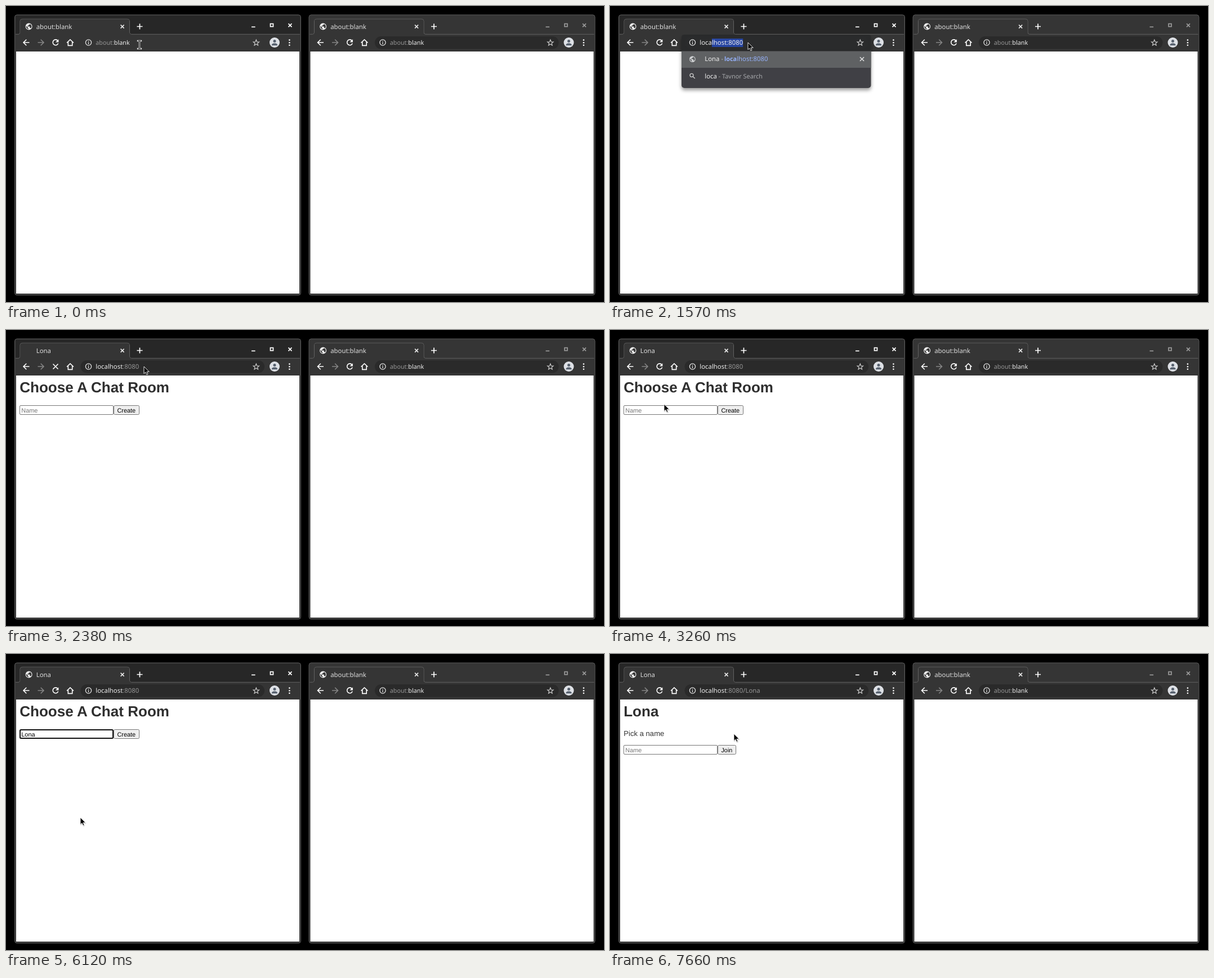
Recreate the animation shown at these times as an HTML page. Size 1062 by 527 pixels, loop 8 s.

```html
<!DOCTYPE html>
<html lang="en">
<head>
<meta charset="utf-8">
<title>Chat room demo</title>
<style>
  html, body { margin: 0; width: 100%; height: 100%; overflow: hidden; background: #000; }
  svg { display: block; width: 1062px; height: 527px; }
  text { text-rendering: geometricPrecision; white-space: pre; }
  .ui { font-family: "Noto Sans", sans-serif; font-size: 11.35px; }
  .page { font-family: "Liberation Sans", Arial, sans-serif; }
</style>
</head>
<body>
<svg id="stage" viewBox="0 0 1062 527"></svg>
<script>
const LOOP = 8000;
const UI = '11.35px "Noto Sans", sans-serif';
const FORM = '10.9px "Liberation Sans", Arial, sans-serif';
const stage = document.getElementById('stage');
const ruler = document.createElement('canvas').getContext('2d');
ruler.textRendering = 'geometricPrecision';

const widthOf = (text, font) => {
  ruler.font = font;
  return ruler.measureText(text).width;
};

// Value of the last [time, ...value] entry that has begun.
const at = (track, t) => track.filter(step => step[0] <= t).pop().slice(1);

const pointerTrack = [
  [0, 'beam', 237, 69], [140, 'beam', 243, 66], [420, 'arrow', 245, 65],
  [3260, 'arrow', 96, 132], [3360, 'beam', 88.5, 138], [3520, 'beam', 89.5, 142], [3550, 'beam', 90.5, 146],
  [4060, 'arrow', 103, 195], [4180, 'arrow', 115, 235], [4250, 'arrow', 126, 271], [4330, 'arrow', 132, 291],
  [6500, 'arrow', 172, 258], [6590, 'arrow', 236, 205], [6690, 'arrow', 271, 174],
  [6830, 'arrow', 256, 167], [6920, 'arrow', 242, 157], [7010, 'arrow', 228, 148], [7100, 'arrow', 220, 142]
];
const urlTrack = [[1380, 'lo'], [1570, 'loca'], [1900, 'localhost:8080']];
const nameTrack = [[0, ''], [5030, 'L'], [5320, 'Lo'], [5430, 'Lon'], [5530, 'Lona']];
const caretTrack = [[0, false], [3850, true], [4470, false], [5030, true], [6120, false], [6620, true], [7310, false]];

const rect = (x, y, w, h, fill, more = '') =>
  `<rect x="${x}" y="${y}" width="${w}" height="${h}" fill="${fill}" ${more}/>`;
const circle = (x, y, r, fill, more = '') => `<circle cx="${x}" cy="${y}" r="${r}" fill="${fill}" ${more}/>`;
const line = (d, color, width = 1.6, more = '') =>
  `<path d="${d}" fill="none" stroke="${color}" stroke-width="${width}" ${more}/>`;
const label = (x, y, text, fill, size = 11.35) =>
  `<text class="ui" x="${x}" y="${y}" fill="${fill}" style="font-size:${size}px">${text}</text>`;
const pageText = (x, y, text, size, fill, more = '') =>
  `<text class="page" x="${x}" y="${y}" font-size="${size}" fill="${fill}" ${more}>${text}</text>`;
const cross = (x, y, r, color, width) =>
  line(`M${x - r} ${y - r}l${2 * r} ${2 * r}m0 ${-2 * r}l${-2 * r} ${2 * r}`, color, width);
const dim = text => `<tspan fill="#959595">${text}</tspan>`;

const globe = (x, y, r, color) => `<path transform="translate(${x} ${y}) scale(${r / 10}) translate(-12 -12)" fill="${color}"
  d="M12 2a10 10 0 1 0 0 20a10 10 0 0 0 0-20zM11 19.9c-4-.5-7-3.8-7-7.9 0-.6.1-1.2.2-1.8L9 15v1c0 1.1.9 2 2 2zM17.9 17.4
  c-.3-.8-1-1.4-1.9-1.4h-1v-3c0-.5-.4-1-1-1H8v-2h2c.5 0 1-.5 1-1V7h2c1.1 0 2-.9 2-2v-.4c2.9 1.2 5 4.1 5 7.4 0 2-.8 4-2.1 5.4z"/>`;

const starPoints = Array.from({ length: 10 }, (_, i) => {
  const r = i % 2 ? 2.4 : 5.6, a = i * Math.PI / 5 - Math.PI / 2;
  return `${(444.3 + r * Math.cos(a)).toFixed(1)},${(65.6 + r * Math.sin(a)).toFixed(1)}`;
}).join(' ');

function frame(active, title, tabIcon) {
  const control = active ? '#fff' : '#999';
  return rect(15.5, 15.8, 508, 499, '#353535', 'rx="4" stroke="#585858"') +
    rect(17, 17, 505, 33, active ? '#272727' : '#353535') +
    line('M17 50.3H22Q25 50.3 25 47V27Q25 23.2 29 23.2H215.5Q219.5 23.2 219.5 27V47Q219.5 50.3 222.5 50.3H522', '#626262', 1) +
    `<path d="M22 51Q25.5 50 25.5 47V27Q25.5 23.7 29 23.7H215.5Q219 23.7 219 27V47Q219 50 222.5 51Z" fill="#353535"/>` +
    rect(18, 81, 503, 431, '#fff') +
    (tabIcon ? globe(40.6, 36.5, 6, '#eee') : '') +
    label(53.7, 40.5, title, '#ddd') +
    cross(206.6, 36.6, 3, '#eee', 1.5) +
    line('M232.5 36.5h10m-5-5v10', '#fff', 1.7) +
    line('M436 37.3h6.6', control, 1.7) +
    line('M469.5 31.6h5v5h-5z', control, 1.7) +
    cross(504.5, 34.4, 3, control, 1.7);
}

function toolbar(loading) {
  const reload = loading ? cross(88, 65, 4.5, '#fff', 1.6)
    : line('M91.9 61.7A4.9 4.9 0 1 0 92.7 66.5', '#fff') + '<path d="M93.4 59.2v5.4H88z" fill="#fff"/>';
  return line('M41.5 65H31m5.3-5.3L31 65l5.3 5.3', '#fff') +
    line('M56.5 65H67m-5.3-5.3L67 65l-5.3 5.3', '#858585') + reload +
    line('M108 65.5l6-5.6 6 5.6M110.3 64v6.4h7.4V64', '#fff') +
    circle(477, 65, 9, '#dee1e6') + circle(477, 62.4, 2.5, '#56606e') +
    '<path d="M471.8 70.3q0-4 5.2-4t5.2 4z" fill="#56606e"/>' +
    [60.6, 65.2, 69.8].map(y => circle(503.4, y, 1.3, '#fff')).join('');
}

function omnibox(fill, content, ring) {
  return rect(132.5, 54, 326.5, 22.5, fill, `rx="11.2" ${ring ? 'stroke="#2245a0" stroke-width="1.8"' : ''}`) +
    circle(146.5, 65, 5.1, 'none', 'stroke="#e8e8e8" stroke-width="1.3"') +
    line('M146.5 64.2v3.8m0-6v1.3', '#e8e8e8', 1.3) +
    `<polygon points="${starPoints}" fill="none" stroke="#d5d5d5" stroke-width="1.1"/>` + content;
}

const blankUrl = label(159.3, 69, dim('about:') + 'blank', '#eee', 10.75);
const address = path => label(159.3, 69, 'localhost' + dim(':8080' + path), '#eee');

function editedAddress(typed) {
  const full = 'localhost:8080';
  const start = 159.3 + widthOf(typed, UI);
  const rest = widthOf(full, UI) - widthOf(typed, UI);
  const mark = typed === full ? rect(start, 58.5, 1, 14, '#fff') : rect(start, 58, rest, 15, '#2745a2');
  return mark + label(159.3, 69, full, '#eee');
}

function suggestions(typed) {
  const rest = 'localhost:8080'.slice(typed.length);
  return rect(127, 52, 336.5, 94, '#404144', 'rx="5" filter="url(#drop)"') +
    '<path d="M127 80.5V56q0-5 5-5H458.5q5 0 5 5V80.5z" fill="#292a2b"/>' +
    rect(127, 80.5, 336.5, 29.5, '#5f6163') +
    globe(146.4, 94.6, 5.4, '#d0d2d4') +
    label(168.3, 98.4, `Lona<tspan fill="#b0b2b5"> - </tspan><tspan x="203" fill="#95b1fa"><tspan font-weight="700" style="font-size:10.87px">${typed}</tspan>${rest}</tspan>`, '#eee') +
    cross(447.5, 94.5, 3.6, '#e5e5e5', 1.4) +
    circle(145, 123.3, 3, 'none', 'stroke="#ccc" stroke-width="1.3"') + line('M147.2 125.5l3.6 3.6', '#ccc', 1.4) +
    label(168.3, 128.6, `${typed}<tspan fill="#a6a8ab" style="font-size:10.9px"> - Tavnor Search</tspan>`, '#eee');
}

function form(y, value, button, width, state) {
  const border = state.focus ? '#101010' : state.hoverInput ? '#4f4f4f' : '#767676';
  const inset = state.focus ? 1 : 0.5;
  const buttonFill = state.pressed ? '#f5f5f5' : state.hoverButton ? '#e5e5e5' : '#efefef';
  const buttonBorder = state.pressed ? '#8d8d8d' : state.hoverButton ? '#4f4f4f' : '#767676';
  return rect(24 + inset, y + inset, 167 - 2 * inset, 17 - 2 * inset, '#fff', `rx="1.5" stroke="${border}" stroke-width="${2 * inset}"`) +
    pageText(27.3, y + 12.7, value || 'Name', 10.9, value ? '#000' : '#757575') +
    rect(191.6, y + .5, width, 16, buttonFill, `rx="2" stroke="${buttonBorder}"`) +
    pageText(197.4, y + 12.7, button, 10.9, '#000') +
    (state.caret ? rect(27.9 + widthOf(value, FORM), y + 3, 1, 12, '#000') : '');
}

const heading = text => pageText(24.2, 110.8, text, 26.05, '#2f2f2f', 'font-weight="700"');

function page(t) {
  if (t < 2380) return '';
  if (t >= 7660) {
    return heading('Lona') + pageText(24.3, 145.7, 'Pick a name', 13.1, '#333') + form(162, '', 'Join', 32, {});
  }
  return heading('Choose A Chat Room') + form(134, at(nameTrack, t)[0], 'Create', 45, {
    focus: t >= 3850 && t < 7310,
    hoverInput: t >= 3360 && t < 4060,
    hoverButton: t >= 7010,
    pressed: t >= 7310 && t < 7370,
    caret: at(caretTrack, t)[0]
  });
}

function addressBar(t) {
  if (t < 290) return omnibox('#353535', blankUrl);
  if (t < 1380) {
    const selected = rect(159.3, 58, widthOf('about:blank', UI.replace('11.35', '10.75')), 15, '#2745a2');
    return omnibox('#202124', selected + label(159.3, 69, 'about:blank', '#eee', 10.75), true);
  }
  if (t < 2380) {
    const typed = at(urlTrack, t)[0];
    return suggestions(typed) + omnibox('#2a2b2c', t < 2280 ? editedAddress(typed) : address(''));
  }
  return omnibox('#2a2a2a', address(t < 7580 ? '' : '/Lona'));
}

function pointer(t) {
  const [kind, x, y] = at(pointerTrack, t);
  const beam = 'M-2.8-7H2.8M0-7V7M-2.8 7H2.8';
  const shape = kind === 'beam'
    ? line(beam, '#fff', 2.6, 'stroke-linecap="square"') + line(beam, '#000', 1.1)
    : '<path d="M0 0V12.6L2.9 10 4.9 14.5 7 13.6 5.1 9.3H9.2Z" fill="#000" stroke="#fff" stroke-width=".9" filter="url(#soft)"/>';
  return `<g transform="translate(${x} ${y})">${shape}</g>`;
}

const defs = `<defs>
  <filter id="drop" x="-5%" y="-10%" width="110%" height="140%"><feDropShadow dx="0" dy="4" stdDeviation="3.2" flood-opacity=".4"/></filter>
  <filter id="soft" x="-40%" y="-40%" width="200%" height="200%"><feDropShadow dx=".5" dy=".8" stdDeviation=".7" flood-opacity=".35"/></filter>
</defs>`;
const idleWindow = `<g transform="translate(522.5 0)">${frame(false, 'about:blank', true)}${toolbar(false)}${omnibox('#2a2a2a', blankUrl)}</g>`;

function scene(t) {
  const loading = t >= 2280 && t < 2460;
  return defs + rect(0, 0, 1062, 527, '#000') + idleWindow +
    frame(true, t < 2380 ? 'about:blank' : 'Lona', !loading) +
    toolbar(loading) + page(t) + addressBar(t) + pointer(t);
}

let shown = '';
function draw() {
  const next = scene(performance.now() % LOOP);
  if (next !== shown) stage.innerHTML = shown = next;
  requestAnimationFrame(draw);
}
draw();
</script>
</body>
</html>
```
